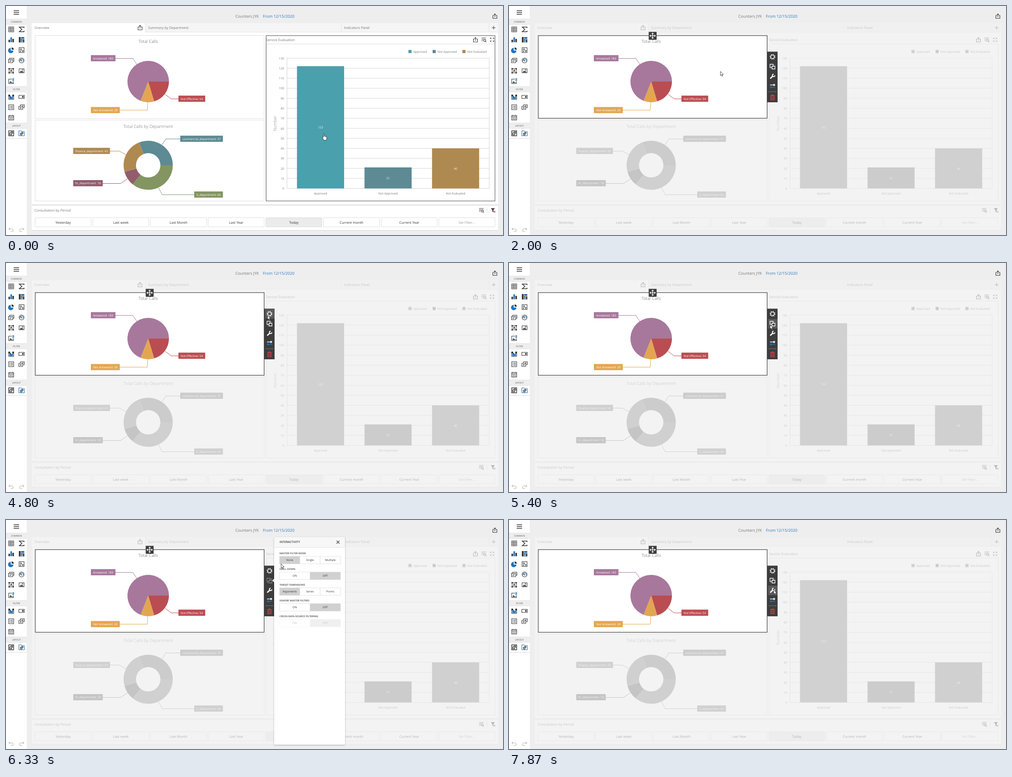
Recreate the animation shown at these times as an HTML page. Size 1101 by 509 pixels, loop 8 s.

```html
<!DOCTYPE html>
<html lang="en">
<head>
<meta charset="utf-8">
<title>Dashboard designer</title>
<style>
html, body { margin: 0; width: 100%; height: 100%; overflow: hidden; background: #eee; }
svg { display: block; width: 100%; height: 100%; }
text { font-family: 'Open Sans', 'Noto Sans', sans-serif; text-rendering: geometricPrecision; }
.icon { fill: none; stroke: currentColor; stroke-width: 1.1; }
.solid { fill: currentColor; stroke: none; }
.blue { stroke: #1f74bf; }
.bluefill { fill: #1f74bf; stroke: none; }
.panel { filter: drop-shadow(0 1px 1.5px rgba(0,0,0,.3)); }
</style>
</head>
<body>
<svg id="stage" viewBox="0 0 1101 509"></svg>
<script>
const TEAL = '#4aa0ac', SLATE = '#5d8a93', GOLD = '#ae8a50', PURPLE = '#a7789c',
  RED = '#ba4d51', ORANGE = '#e3a650', OLIVE = '#849562', PLUM = '#925d6c', MENU = '#3d3d3d';

const box = (x, y, w, h, fill = 'none', stroke = 'none', more = '') =>
  `<rect x="${x}" y="${y}" width="${w}" height="${h}" fill="${fill}" stroke="${stroke}" ${more}/>`;
const line = (d, stroke = '#d5d5d5', width = 1) =>
  `<path d="${d}" fill="none" stroke="${stroke}" stroke-width="${width}"/>`;
// y is the middle of the capital letters
const text = (x, y, str, size, fill = '#767676', anchor = 'start', more = '') =>
  `<text x="${x}" y="${y + size * .357}" font-size="${size}" fill="${fill}" text-anchor="${anchor}" ${more}>${str}</text>`;
const mid = (x, y, str, size, fill, more) => text(x, y, str, size, fill, 'middle', more);
const group = (id, body, more = '') => `<g id="${id}" ${more}>${body}</g>`;
const icon = (name, x, y, color = '#333', id = '') =>
  `<g class="icon" ${id && `id="${id}"`} transform="translate(${x} ${y})" color="${color}">${icons[name]}</g>`;

const p = (d, cls = '', width = '') => `<path d="${d}" class="${cls}" ${width && `stroke-width="${width}"`}/>`;
const icons = {
  menu: p('M-6-4H6M-6 0H6M-6 4H6', '', 1.4),
  share: p('M-2-1.5H-4.5V5H4.5V-1.5H2M0 2V-5M-2-3L0-5 2-3'),
  find: p('M-5-4H5M-5-1H-1M-5 2H-2M3.6 3.3L5.5 5.5') + '<circle cx="2" cy="1.4" r="2.3"/>',
  expand: p('M-4-1.5V-4H-1.5M1.5-4H4V-1.5M4 1.5V4H1.5M-1.5 4H-4V1.5M-4-4L-1.5-1.5M4-4L1.5-1.5M4 4L1.5 1.5M-4 4L-1.5 1.5', '', .9),
  clear: p('M-5-4.5H4L.7-.5V4.5L-1.5 3V-.5Z', 'solid') + '<path d="M1.5 1.5L5 5M5 1.5L1.5 5" stroke="#d04a4a"/>',
  plus: p('M-4 0H4M0-4V4', '', 1.2),
  grid: p('M-5.5-5.5H5.5V5.5H-5.5ZM-5.5-2H5.5M-5.5 1.7H5.5M-2-5.5V5.5M1.7-5.5V5.5'),
  sigma: p('M5.3-3V-5.2H-5L.5 0-5 5.2H5.3V3', '', 1.6),
  bars: p('M-6 0H-2.7V5.5H-6ZM2.7-2H6V5.5H2.7Z', 'solid') + p('M-1.7-5.5H1.7V5.5H-1.7Z', 'bluefill'),
  tree: p('M-6-6H-2V6H-6ZM-1-1H2V2H-1ZM3-1H6V6H3Z', 'solid') + p('M-1-6H6V-2H-1ZM-1 3H2V6H-1Z', 'bluefill'),
  pie: p('M-1-5A6 6 0 1 0 5 1H-1Z', 'bluefill') + p('M1-6A6 6 0 0 1 6-1H1Z', 'solid'),
  scatter: p('M-5.5-5.5H5.5V5.5H-5.5Z') + '<circle cx="-1.5" cy="-1.5" r="1.7"/><circle cx="2.5" cy="2" r="1.3"/><circle cx="-2.5" cy="3" r=".7"/>',
  cards: p('M-3.5-2.5V-5H6V2H3.5M-6-2.5H3.5V5H-6ZM-4 0H1.5M-4 2.5H0'),
  gauge: '<circle r="5.5"/>' + p('M-3.3 2A3.7 3.7 0 1 1 3.3 2', 'blue') + p('M1 2L-2.5-2', '', 1.5),
  textbox: p('M-4.5-4.5H4.5V4.5H-4.5ZM-2 2.5L0-2.5 2 2.5M-1 1H1') +
    p('M-6-6h3v3h-3zM3-6h3v3h-3zM-6 3h3v3h-3zM3 3h3v3h-3z', 'solid'),
  image: p('M-5.5-4.5H5.5V4.5H-5.5Z') + p('M-4 3.5L-1.5-.5 .5 1.5 2 0 4 3.5Z', 'solid') + '<circle cx="2" cy="-2" r=".7"/>',
  bound: p('M1.5-4.5H-5.5V5.5H5V1') + p('M-4 4L-1.5 0 1 3 2 2 4 4Z', 'solid') + p('M2.5-5.5H6.5M2.5-3.2H6.5M2.5-.9H6.5', 'blue', 1.4),
  range: p('M-5.5-5V5.5H5.5V-5') + p('M-4 4.5V0L-1.5-3 1 1 4-3V4.5Z', 'bluefill') + p('M-6-5h3.5v4h-3.5zM2.5-5h3.5v4h-3.5z', 'solid'),
  combo: p('M-6-3.5H6V3.5H-6Z') + p('M1-1.7H4.5V1.7H1Z', 'solid'),
  list: p('M-5.5-5.5H5.5V5.5H-5.5ZM-3.7-2.5H-2M-1-2.5H3.7M-3.7 0H-2M-1 0H3.7M-3.7 2.5H-2M-1 2.5H3.7'),
  nodes: p('M-2.5-5.5H6V1H3M-2.5-5.5V-2M-6-2H2.5V5H-6ZM-3.8 1.5H.2M-1.8-.5V3.5M1-2.5H4M2.5-4V-1'),
  date: p('M-5.5-4.5H5.5V5.5H-5.5ZM-5.5-2H5.5M-3-6V-4M3-6V-4') + p('M-3.5 .5H3.7M-3.5 3.2H3.7', '', '1.5" stroke-dasharray="1.6 1.2'),
  tabs: p('M-5.5-5.5H5.5V5.5H-5.5ZM-3.2-1V3.2H1V-1ZM-1-3.2H3.2V1', '', 1.4),
  folder: p('M-6 5.5V-5.5H-1L.5-3.7H6V5.5Z', 'blue') + p('M-2.5 0V3.5H1V0ZM-.5-1.8H3V1.5', '', 1.3),
  undo: p('M-2.5-4L-5-1.5-2.5 1M-5-1.5H1.5A3 3 0 0 1 1.5 4.5H-1'),
  redo: p('M2.5-4L5-1.5 2.5 1M5-1.5H-1.5A3 3 0 0 0-1.5 4.5H1'),
  move: p('M-5 0H5M0-5V5M-2-4L0-6 2-4M-2 4L0 6 2 4M-4-2L-6 0-4 2M4-2L6 0 4 2', '', 1.3),
  gear: '<circle r="3.9" stroke-width="1.4"/><circle r="5.4" stroke-width="1.8" stroke-dasharray="1.9 2.34"/>',
  link: p('M-5.5-5.5H1.5V1.5H-5.5Z', '', 1.3) + `<path d="M-1-1H5.5V5H-1Z" fill="${MENU}" stroke-width="1.3"/>` + p('M2.8-4.5H4.8V-2.5M-4.5 2.7V4.5H-2.5', 'mark'),
  wrench: p('M-5 4.8L1-1', '', 2.8) + p('M2.5-5A2.7 2.7 0 1 0 5.2-2.2', '', 2),
  convert: p('M-5.5-2.5H4M2.5-4.7L5-2.5 2.5-.3', '', 1.7) + p('M5.5 2.7H-4M-2.5.5L-5 2.7-2.5 4.9', 'blue', 1.7),
  trash: p('M-5-3.7H5M-1.7-4V-5.3H1.7V-4M-3.8-3V5.3H3.8V-3M-1.5-2V4M1.5-2V4', '', 1.2),
  close: p('M-3.3-3.3L3.3 3.3M3.3-3.3L-3.3 3.3'),
};

const polar = (cx, cy, r, a) => `${(cx + r * Math.cos(a)).toFixed(2)} ${(cy + r * Math.sin(a)).toFixed(2)}`;
function slices(cx, cy, outer, inner, data) {
  const total = data.reduce((sum, d) => sum + d[0], 0);
  let a = 0;
  return data.map(([value, color]) => {
    const b = a + value / total * Math.PI * 2, large = +(b - a > Math.PI);
    const d = `M${polar(cx, cy, outer, a)}A${outer} ${outer} 0 ${large} 1 ${polar(cx, cy, outer, b)}` +
      `L${polar(cx, cy, inner, b)}A${inner} ${inner} 0 ${large} 0 ${polar(cx, cy, inner, a)}Z`;
    a = b;
    return `<path d="${d}" fill="${color}"/>`;
  }).join('');
}
const tag = (x, y, w, str, color, leader) => line(leader, color) + box(x, y, w, 13.7, color) +
  mid(x + w / 2, y + 7, str, 6.5, '#fff');

function sidebar() {
  const head = (y, str) => box(0, y, 46, 12, '#eee') + line(`M0 ${y}H46M0 ${y + 12}H46`, '#e2e2e2') +
    mid(23, y + 6.2, str, 5.2, '#555');
  const pairs = (y, names) => names.map((n, i) => icon(n, 11.5 + i % 2 * 23, y + (i >> 1) * 23)).join('');
  return box(0, 0, 46, 509, '#fff') + icon('menu', 23, 14.5) +
    head(29, 'COMMON') + pairs(52, ['grid', 'sigma', 'bars', 'tree', 'pie', 'scatter', 'cards', 'gauge', 'textbox', 'image', 'bound']) +
    head(179, 'FILTER') + pairs(202, ['range', 'combo', 'list', 'nodes', 'date']) +
    head(260, 'LAYOUT') + pairs(283, ['tabs', 'folder']) +
    line('M0 294.5H46', '#ddd') + icon('undo', 11.5, 497, '#bbb') + icon('redo', 34.5, 497, '#bbb');
}

function tabBar() {
  return box(309, 38, 781, 20, '#f5f5f5') + line('M309 38V58H1090M743 38V58M1070 38V58', '#e2e2e2') +
    text(63, 48.3, 'Overview', 7.6) + text(315, 48.3, 'Summary by Department', 7.6) +
    text(749, 48.3, 'Indicators Panel', 7.6) + icon('share', 297, 48) + icon('plus', 1080.3, 48.3, '#555');
}

function barChart() {
  const y = v => 405.5 - v * 2.227;
  let out = box(576, 84.5, 507.5, 349, '#fff', '#ddd') + text(576, 75, 'Service Evaluation', 7.6) +
    icon('share', 1040, 75) + icon('find', 1058.5, 75) + icon('expand', 1077, 75);
  for (let v = 0; v <= 130; v += 10)
    out += line(`M622 ${y(v)}H1070.5`) + text(616, y(v) + .3, v, 6.5, '#767676', 'end');
  out += line('M622.5 116V405.5M1070.5 116V405.5');
  const bars = [['Approved', 122, TEAL, 891.5], ['Not Approved', 21, SLATE, 945], ['Not Evaluated', 40, GOLD, 1011]];
  bars.forEach(([name, v, color, x], i) => {
    const cx = 696.8 + i * 149.6;
    out += box(cx - 52.2, y(v), 104.4, y(0) - y(v), color) + mid(cx, y(v / 2) + .5, v, 6.5, '#fff') +
      mid(cx, 416.3, name, 6.6) + box(x, 97.7, 7, 7, color) + text(x + 11, 101.3, name, 6.6);
  });
  return out + mid(0, 0, 'Number', 9.1, '#767676', 'font-weight="300" transform="translate(596 261) rotate(-90)"');
}

function donutChart() {
  return box(64.5, 253.5, 507.5, 180, '#fff', '#ddd') +
    mid(315, 268, 'Total Calls by Department', 9.6, '#666', 'font-weight="300"') +
    slices(315, 354, 54.5, 27, [[66, OLIVE], [18, PLUM], [43, GOLD], [57, SLATE]]) +
    tag(386, 288.2, 94.5, 'commercial_department: 57', SLATE, 'M386 295.5H354L346 308') +
    tag(149, 315.2, 81.3, 'finance_department: 43', GOLD, 'M230 322.5H251L267 331') +
    tag(149, 387, 65.3, 'hr_department: 18', PLUM, 'M214 394.5H254L269 384') +
    tag(417, 412.2, 63.5, 'it_department: 66', OLIVE, 'M417 419.5H346L338 404');
}

function pieChart() {
  return box(64.5, 65.5, 507.5, 184.5, '#fff', '#ddd') +
    mid(315, 79, 'Total Calls', 9.6, '#555', 'font-weight="300"') +
    slices(315, 168, 46, 0, [[54, RED], [28, ORANGE], [183, PURPLE]]) +
    tag(188, 109.2, 54.5, 'Answered: 183', PURPLE, 'M242 116.5H281L290 130') +
    tag(382, 199.2, 59.3, 'Not Effective: 54', RED, 'M382 206.5H366L352 196') +
    tag(188, 224.5, 64, 'Not Answered: 28', ORANGE, 'M252 231.5H313L314 214');
}

function periods() {
  const names = ['Yesterday', 'Last week', 'Last Month', 'Last Year', 'Today', 'Current month', 'Current Year', 'Set Filter...'];
  return text(63, 454, 'Consultation by Period', 7.62) + icon('find', 1053, 454) +
    line('M1065.5 448V460', '#ddd') + icon('clear', 1079, 454) +
    names.map((n, i) => box(64.5 + i * 127.8, 470.5, 124, 20.5, i === 4 ? '#ebebeb' : '#fff', '#ddd', 'rx="1"') +
      mid(126.5 + i * 127.8, 481, n, 7.55, i === 7 ? '#999' : '#333')).join('');
}

const sheet = (x, y, w, h) => box(x, y + 1.2, w, h, '#dcdcdc') + box(x, y, w, h, '#fff');
const buttonY = [113, 135, 156.5, 178, 203];
const toolMenu = () => box(572, 101.5, 23, 112.5, MENU) +
  `<rect id="hover" x="574" width="21" height="21" fill="#5a5a5a"/>` +
  ['gear', 'link', 'wrench', 'convert', 'trash'].map((n, i) =>
    icon(n, 583.7, buttonY[i], i === 4 ? '#d9434a' : '#fff', 'tool' + i)).join('') +
  line('M575 190.5H593', '#777') + '<path id="pointer" d="M595 -5L590 0L595 5Z" fill="#fff"/>' +
  box(309.5, 57.5, 17.5, 17.5, MENU) + icon('move', 318.2, 66.2, '#fff');

const drawer = (w, body = '') => box(594, 38, w, 461.5, '#fff', 'none', 'class="panel"') +
  box(594, 38, w, 23, '#f7f7f7') + line(`M594 61H${594 + w}`, '#e0e0e0') +
  icon('close', 578.5 + w, 49.2) + body;

function interactivity() {
  const onOff = ['ON', 'OFF'];
  const rows = [['MASTER FILTER MODE', ['None', 'Single', 'Multiple'], 0], ['DRILL DOWN', onOff, 1],
    ['TARGET DIMENSIONS', ['Arguments', 'Series', 'Points'], 0], ['IGNORE MASTER FILTERS', onOff, 1],
    ['CROSS-DATA-SOURCE FILTERING', onOff, 1]];
  return text(606, 49, 'INTERACTIVITY', 6.4, '#333', 'start', 'font-weight="600"') + rows.map(([name, opts, on], i) => {
    const y = 80.8 + 35 * i, w = 135 / opts.length;
    const cells = opts.map((o, k) => box(606 + k * w, y, w, 16.7, k === on ? '#d0d0d0' : '#fff', '#ddd', 'stroke-width=".8"') +
      mid(606 + (k + .5) * w, y + 8.5, o, 6.15, '#333')).join('');
    return text(606, y - 7.2, name, 5.55, '#444', 'start', 'font-weight="600"') + `<g opacity="${i === 4 ? .3 : 1}">${cells}</g>`;
  }).join('');
}

const cursors = group('hand', `<path d="M-1 8V1Q0-.6 1.2 1V5.5Q2.4 4.6 3 6Q4.3 5.3 4.8 6.6Q6.4 6 6.5 7.8V10.5Q6.3 12.5 5.3 14.3H.3L-2.7 9.6Q-3.4 8-2 7.8Z" fill="#fff" stroke="#222" stroke-width=".9"/>`) +
  group('arrow', '<path d="M.4.4V9.6L2.5 7.7 4 11.2 5.6 10.5 4.1 7.2H7Z" fill="#fff" stroke="#222" stroke-width=".8"/>');

document.getElementById('stage').innerHTML = box(0, 0, 1101, 509, '#eee') + sidebar() +
  text(508, 23, 'Counters JYK', 8.75) + text(569, 23, 'From 12/15/2020', 8.75, '#2b76bd') + icon('share', 1083, 22.5) +
  group('dim', sheet(57, 38, 1033, 403) + sheet(57, 444.3, 1033, 53.7) + tabBar() + barChart() + donutChart() + periods()) +
  pieChart() +
  group('pieFrame', box(64.8, 65.8, 507, 183.7, 'none', '#505050', 'stroke-width="1.3"')) +
  group('barFrame', box(576.3, 65.8, 507, 367.6, 'none', '#707070', 'stroke-width="1.3"')) +
  group('menu', toolMenu()) + group('binding', drawer(125)) + group('interact', drawer(157, interactivity())) + cursors;

const el = id => document.getElementById(id);
const show = (id, on) => { el(id).style.display = on ? '' : 'none'; };

// cursor hot spot: time, x, y
const path = [[0, 704, 284], [66, 680, 280], [133, 680, 280], [200, 647, 274], [400, 647, 274], [867, 454, 204.5],
  [1400, 454, 204.5], [1667, 468, 145], [2400, 468, 145], [3267, 578, 116], [3730, 578, 116], [3800, 579, 116],
  [4800, 579, 116], [5400, 578, 137], [5600, 578, 137], [6333, 609, 97], [6400, 609, 98], [6933, 612, 169],
  [7000, 612, 169], [7400, 584, 137], [7530, 584, 138], [7867, 586, 155], [8000, 586, 155]];
function cursorAt(t) {
  const i = Math.max(1, path.findIndex(k => k[0] > t));
  const [t0, x0, y0] = path[i - 1], [t1, x1, y1] = path[i];
  const u = (t - t0) / (t1 - t0), e = u * u * (3 - 2 * u);
  return [x0 + (x1 - x0) * e, y0 + (y1 - y0) * e];
}

const STEP = 1000 / 15, LOOP = 8000;
function render(now) {
  const t = Math.floor((now % LOOP + 4) / STEP) * STEP % LOOP + .01;
  const within = (a, b) => t >= a - 5 && t < b - 5;
  const [x, y] = cursorAt(t);
  const selected = t > 1925, hand = !selected;
  const fade = t < 1925 ? 0 : t < 1995 ? .5 : 1;
  el('dim').style.opacity = 1 - .7 * fade;
  el('dim').style.filter = fade ? `grayscale(${fade})` : 'none';

  show('barFrame', !selected && x > 575);
  show('pieFrame', selected || x <= 573);
  show('menu', selected);
  show('hand', hand);
  show('arrow', !hand);
  el(hand ? 'hand' : 'arrow').setAttribute('transform', `translate(${x.toFixed(2)} ${y.toFixed(2)})`);

  const open = within(3600, 4800) ? 0 : within(5600, 7467) ? 1 : -1;
  const over = x > 573.5 && x < 594.5 ? buttonY.findIndex(b => Math.abs(y - b) < 10.8) : -1;
  show('hover', over >= 0 && over !== open);
  if (over >= 0) el('hover').setAttribute('y', buttonY[over] - 10.5);
  show('pointer', open >= 0);
  if (open >= 0) el('pointer').setAttribute('transform', `translate(0 ${buttonY[open] - .5})`);
  [0, 1].forEach(i => { el('tool' + i).setAttribute('color', open === i ? '#858585' : '#fff'); });
  el('tool1').lastChild.style.stroke = open === 1 ? '#858585' : '#2f86d1';
  show('binding', within(4067, 4800));
  show('interact', within(6000, 7467));
}
function tick() {
  render(performance.now());
  requestAnimationFrame(tick);
}
tick();
</script>
</body>
</html>
```
